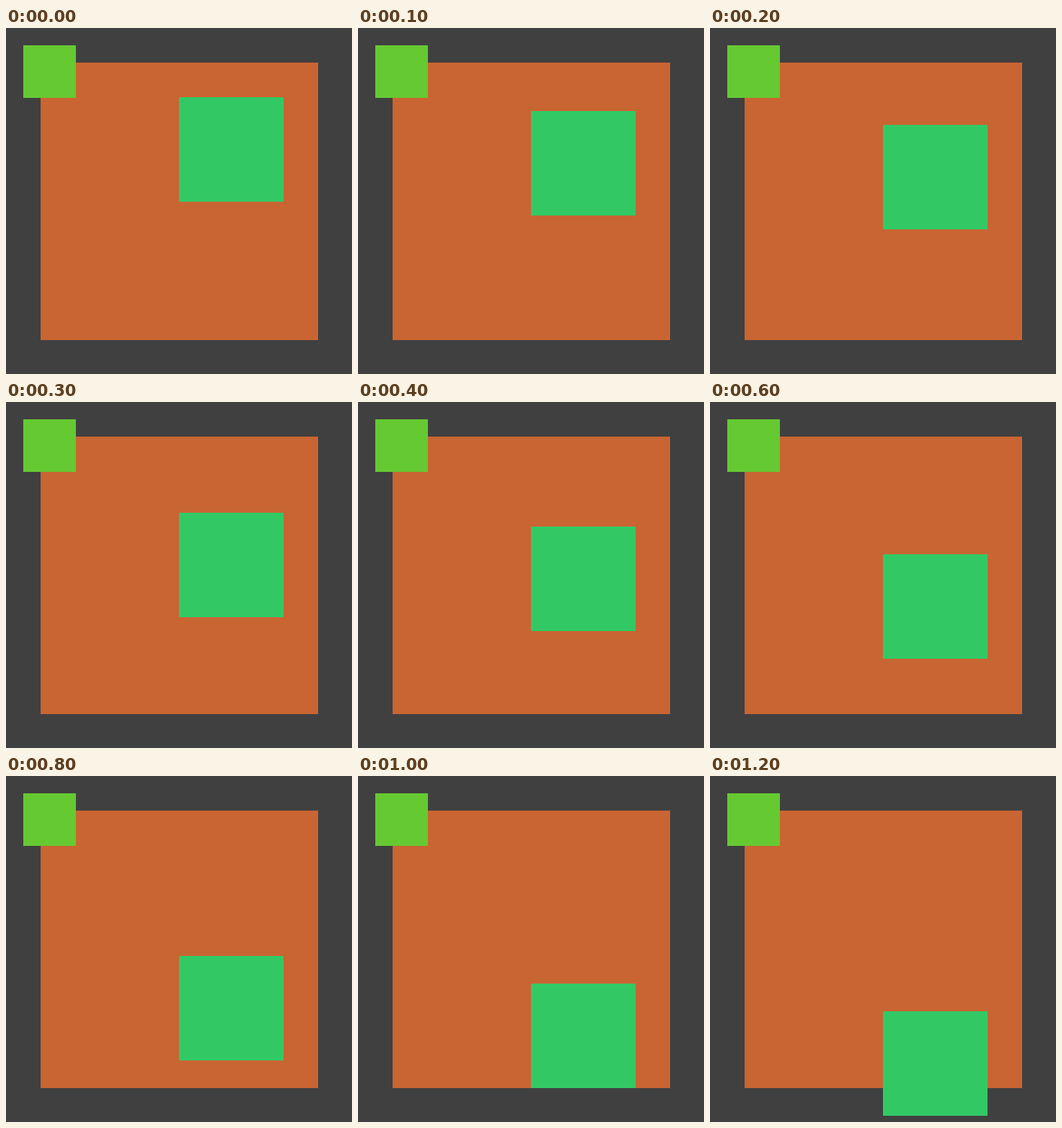
Write an HTML page with a canvas that moves like this. It is 500 by 500 pixels and loops after 1.25 s.

```html
<!DOCTYPE html>
<html lang="en">
<head>
<meta charset="utf-8">
<title>Sliding square</title>
<style>
  html, body { margin: 0; width: 100%; height: 100%; overflow: hidden; background: #404040; }
  canvas { display: block; }
</style>
</head>
<body>
<canvas id="stage" width="500" height="500"></canvas>
<script>
  const ctx = document.getElementById('stage').getContext('2d');
  const LOOP_MS = 1250;
  const STEP_MS = 50;
  const STEP_PX = 10;

  function square(x, y, size, color) {
    ctx.fillStyle = color;
    ctx.fillRect(x, y, size, size);
  }

  function draw(time) {
    const step = Math.floor((time % LOOP_MS) / STEP_MS);
    square(0, 0, 500, '#404040');
    square(50, 50, 401, '#c96532');
    square(25, 25, 76, '#65c932');
    square(250, 100 + step * STEP_PX, 151, '#32c965');
  }

  const start = performance.now();
  function tick() {
    draw(performance.now() - start);
    requestAnimationFrame(tick);
  }
  tick();
</script>
</body>
</html>
```
